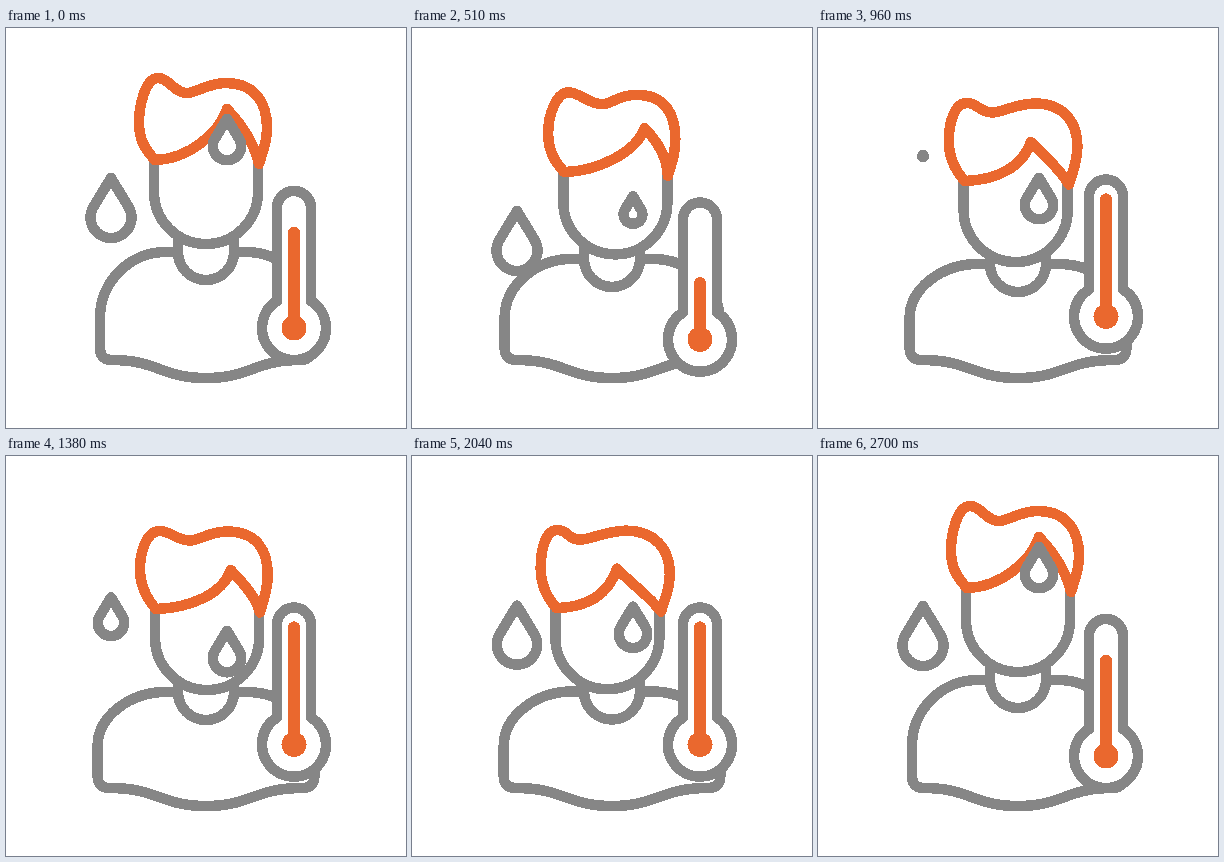
Write an HTML page that moves like this. It is 400x400 px and loops after 2.73 s.

```html
<!DOCTYPE html>
<html lang="en">
<head>
<meta charset="utf-8">
<title>Fever</title>
<style>
  html, body { margin: 0; width: 100%; height: 100%; overflow: hidden; background: #fff; }
  svg { display: block; width: 100%; height: 100%; shape-rendering: crispEdges; }
  path { stroke: #868686; stroke-width: 10.5; stroke-linejoin: round; stroke-linecap: round; fill: #fff; }
  .hot { stroke: #ea682e; }
  .drop { fill: none; }
  #mercury { stroke-width: 12.5; }
</style>
</head>
<body>
<svg viewBox="0 0 400 400">
  <path id="body"/>
  <path id="collar"/>
  <path id="face" d="M148 132V164A52 52 0 0 0 252 164V132"/>
  <path id="hair" class="hot"/>
  <g id="thermometer">
    <path d="M271 273V180A17 17 0 0 1 305 180V273A32 32 0 1 1 271 273Z"/>
    <circle cx="288" cy="300" r="12.5" fill="#ea682e"/>
    <path id="mercury" class="hot"/>
  </g>
  <path id="sideDrop" class="drop"/>
  <path id="faceDrop" class="drop"/>
</svg>
<script>
const LOOP = 2730, STEP = 30;
const el = id => document.getElementById(id);
const setPath = (id, d) => el(id).setAttribute('d', d);
const move = (id, x, y) => el(id).setAttribute('transform', `translate(${x} ${y})`);
const ramp = (t, from, to) => Math.min(1, Math.max(0, (t - from) / (to - from)));
const ease = (t, from, to) => {
  const p = ramp(t, from, to);
  return p * p * (3 - 2 * p);
};

// 0 is upright, 1 is slumped; the head lifts a little before and after.
const nod = t => 1.26 * (ease(t, 180, 720) - ease(t, 2000, 2370))
  - .26 * (ease(t, 0, 180) - ease(t, 2370, 2700));

// Three half swings from right to left, eased in and out.
const turn = t => 16 * ease(t, 150, 700) * Math.cos(3 * Math.PI * ramp(t, 650, 2040))
  * (1 - ease(t, 2040, 2340));

const gauge = t => 11.5 * ease(t, 0, 450) - 23 * ease(t, 500, 960)
  + 14.5 * ease(t, 2040, 2400) - 3 * ease(t, 2400, 2700);

// Teardrop 60 units tall, centred on (x, y): a tip joined to a round belly.
function drawDrop(id, x, y, size) {
  const points = [[0, -30]];
  for (let i = 0; i <= 32; i++) {
    const a = (-31 + 242 * i / 32) * Math.PI / 180;
    points.push([20.5 * Math.cos(a), 9.5 + 20.5 * Math.sin(a)]);
  }
  el(id).style.display = size > .01 ? '' : 'none';
  setPath(id, 'M' + points.map(([a, b]) => `${x + a * size} ${y + b * size}`).join('L') + 'Z');
}

function drawSideDrop(t) {
  if (t < 850) {
    drawDrop('sideDrop', 105, 180 + 33 * (t / 510) ** 2, 1 - ease(t, 580, 760));
  } else {
    const size = 1 - (1 - ramp(t, 940, 2370)) ** 2.8;
    drawDrop('sideDrop', 105, 126 + 54 * size, size);
  }
}

// Three drops per loop; the first one starts at the fringe.
function drawFaceDrop(t) {
  const cycle = LOOP / 3, shifted = (t + 300) % LOOP, age = shifted % cycle;
  const [top, bottom] = shifted < cycle ? [111.5, 191.5] : [170.5, 203];
  const size = ease(age, 0, 250) * (1 - ease(age, 775, 865));
  drawDrop('faceDrop', 221, top + (bottom - top) * ease(age, 480, 900), .69 * size);
}

function drawBody(n) {
  const y = 224 + 12 * n, left = 94 - 2.4 * n, right = 400 - left;
  const bend = 290 - (290 - y) * .55;
  setPath('body', `M200 ${y}H160C124 ${y} ${left} ${bend} ${left} 290V320`
    + `C${left} 328 ${left + 4} 332 ${left + 12} 332C152 332 155 350 200 350`
    + `S248 332 ${right - 12} 332C${right - 4} 332 ${right} 328 ${right} 320V290`
    + `C${right} ${bend} 276 ${y} 240 ${y}Z`);
  setPath('collar', `M172 ${y - 22}V${y}A28 28 0 0 0 228 ${y}V${y - 22}`);
}

// Each point shifts by its own share of the turn and the nod.
function drawHair(n, u) {
  const point = (x, y, dx, dy) => (a = 0, b = 0) => `${x + dx * u + a} ${y + dy * n + b} `;
  const temple = point(149, 132, .28, 21), back = point(133, 95, .27, 18),
    quiff = point(152, 50, .4, 25), dip = point(181, 65, .8, 19.5),
    crown = point(220, 55, .38, 20.5), side = point(261, 100, .2, 19),
    ear = point(253, 136, .25, 20.5), bend = point(248, 114, .6, 28),
    part = point(221, 81, 1, 33);
  setPath('hair', 'M' + temple()
    + 'C' + temple(-9, -10) + back(0, 18) + back()
    + 'C' + back(0, -19) + quiff(-12, 0) + quiff()
    + 'C' + quiff(11, 0) + dip(-13, 0) + dip()
    + 'C' + dip(9, 0) + crown(-18, 0) + crown()
    + 'C' + crown(29, 0) + side(0, -25) + side()
    + 'C' + side(0, 15) + ear(4, -14) + ear()
    + 'C' + bend() + part(15, 16) + part()
    + 'C' + part(-8, 24) + temple(34, -1) + temple() + 'Z');
}

function draw(now) {
  const t = Math.floor(now % LOOP / STEP) * STEP;
  const n = nod(t), u = turn(t), y = gauge(t);
  drawBody(n);
  move('face', .29 * u, 18 * n);
  drawHair(n, u);
  move('thermometer', 0, y);
  setPath('mercury', `M288 300V${205 + y * (y > 0 ? 3.4 : 1.9)}`);
  drawSideDrop(t);
  drawFaceDrop(t);
  requestAnimationFrame(draw);
}
draw(0);
</script>
</body>
</html>
```
